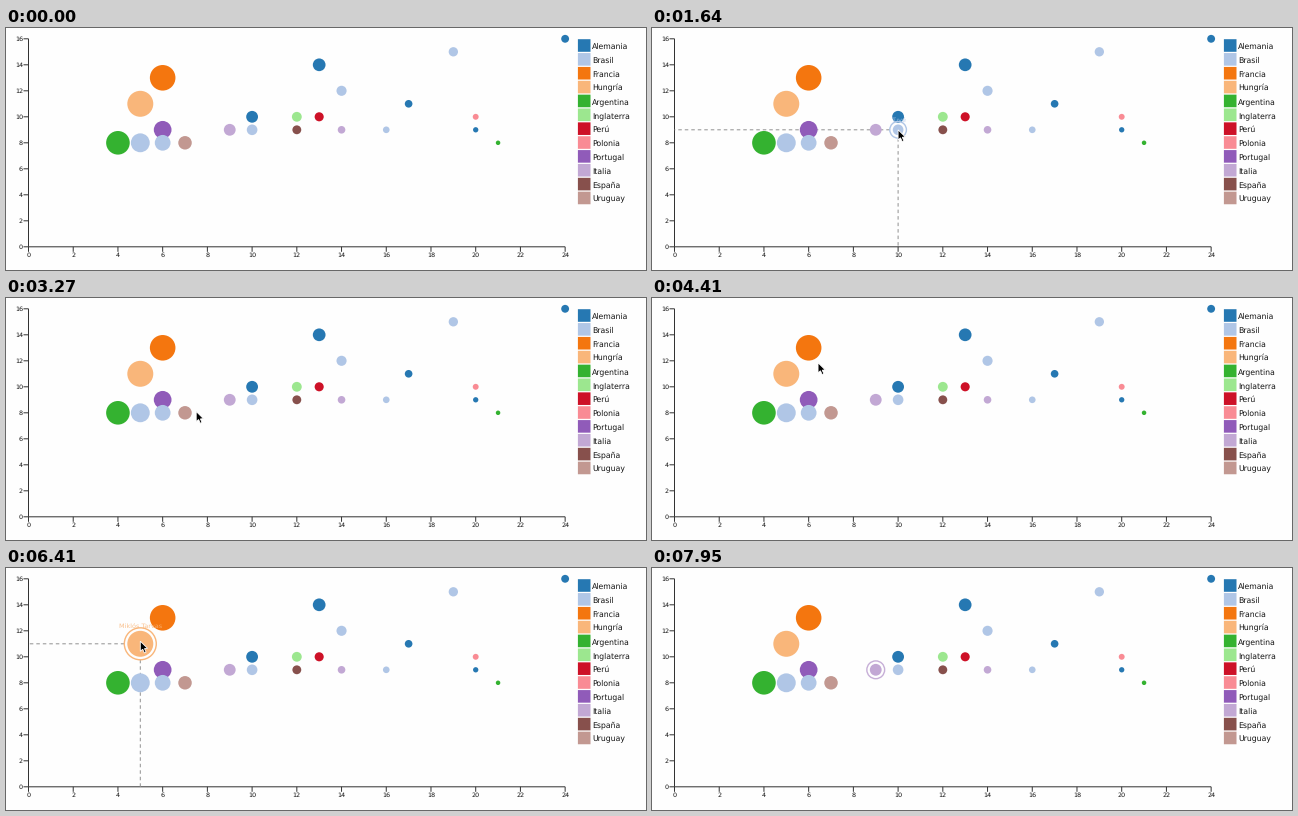
Animation of 640 by 242 pixels, one loop 8 s. Source, as a matplotlib script:

```python
import matplotlib.pyplot as plt
from math import hypot
from matplotlib.animation import FuncAnimation
from matplotlib.patches import Circle, Polygon, Rectangle

W, H, DPI = 640, 242, 100
STEP, FRAMES = 40, 200
PX = 72 / DPI  # points per pixel
X0, Y0 = 22.5, 218.8
GAP = 3  # between a dot and its ring

# country: colour, player, (matches, goals) pairs
TEAMS = {
    "Alemania": ("#2678b2", "Jens Hallbruck",
                 [(24, 16), (13, 14), (17, 11), (10, 10), (20, 9)]),
    "Brasil": ("#b0c6e6", "Tuvé",
               [(19, 15), (14, 12), (10, 9), (16, 9), (5, 8), (6, 8)]),
    "Francia": ("#f4760f", "Luc Bremontel", [(6, 13)]),
    "Hungría": ("#f9b67a", "Miklós Tarvas", [(5, 11)]),
    "Argentina": ("#34b230", "Nico Baldarre", [(4, 8), (21, 8)]),
    "Inglaterra": ("#9ce78f", "Neil Harwick", [(12, 10)]),
    "Perú": ("#cd1127", "Tito Quirama", [(13, 10)]),
    "Polonia": ("#f98b94", "Jan Wolbicki", [(20, 10)]),
    "Portugal": ("#905bb9", "Rui Valdeira", [(6, 9)]),
    "Italia": ("#c2a8d4", "Dario Velucci", [(9, 9), (14, 9)]),
    "España": ("#87504c", "Iker Zaldoa", [(12, 9)]),
    "Uruguay": ("#c29891", "Aníbal Torrano", [(7, 8)]),
}

# cursor rests: from ms, to ms, matches, goals
STOPS = [
    (160, 160, 13.8, 5.3), (640, 2050, 10, 9), (2650, 2750, 7, 8),
    (3000, 3270, 7.5, 8.1), (3700, 3900, 6.1, 13), (4150, 4410, 6.42, 11.85),
    (4700, 4900, 6, 13), (5600, 5640, 5.38, 11.78), (5900, 6550, 5, 11.2),
    (6950, 7330, 7, -2.2), (7600, 7840, 9, 9), (7920, 7920, 9.4, -2.5),
]

ARROW = [(0, 0), (0, 10.2), (2.4, 8), (4.1, 11.8), (5.8, 11),
         (4.2, 7.4), (7.3, 7.2)]

plt.rcParams["font.family"] = "DejaVu Sans"
plt.rcParams["text.hinting"] = "none"

fig = plt.figure(figsize=(W / DPI, H / DPI), dpi=DPI, facecolor="#fefefe")
ax = fig.add_axes([0, 0, 1, 1])
ax.set_xlim(0, W)
ax.set_ylim(H, 0)
ax.axis("off")


def sx(v):
    return X0 + 22.36 * v


def sy(v):
    return Y0 - 13 * v


def line(x0, y0, x1, y1, **kw):
    style = dict(color="#333333", lw=PX, solid_capstyle="butt", snap=False)
    return ax.plot([x0, x1], [y0, y1], **{**style, **kw})[0]


def text(x, y, s, size, ha="center", **kw):
    style = dict(color="#111111", va="baseline", ha=ha)
    return ax.text(x, y, s, fontsize=size * PX, **{**style, **kw})


def draw_axes():
    line(X0, Y0, sx(24), Y0)
    line(X0, sy(16), X0, Y0)
    for v in range(0, 25, 2):
        line(sx(v), Y0, sx(v), Y0 + 5)
        text(sx(v), 229, str(v), 6.4)
    for v in range(0, 17, 2):
        line(X0 - 5, sy(v), X0, sy(v))
        text(17, sy(v) + 2.3, str(v), 6.4, ha="right")


def draw_legend():
    for i, (name, (color, *_)) in enumerate(TEAMS.items()):
        y = 11.2 + 13.86 * i
        ax.add_patch(Rectangle((571.9, y), 12.6, 12.6, fc=color, lw=0,
                               snap=False))
        text(586, y + 9.6, name, 7.8, ha="left")


class Dot:
    """A bubble sized by goals per match, with its hover ring."""

    def __init__(self, color, player, matches, goals):
        self.color, self.player = color, player
        self.x, self.y = sx(matches), sy(goals)
        self.r = 5.9 * goals / matches
        ax.add_patch(Circle((self.x, self.y), self.r, fc=color, lw=0,
                            zorder=3))
        self.ring = ax.add_patch(Circle((self.x, self.y), self.r + GAP,
                                        fill=False, ec=color, lw=1.4 * PX,
                                        zorder=4))
        self.levels = self.ring_levels()

    def holds(self, pos):
        return bool(pos) and hypot(pos[0] - self.x, pos[1] - self.y) < self.r

    def ring_levels(self):
        """Ring strength per frame: quick rise, slower fade."""
        level, out = 0, []
        for pos in cursor_path:
            level += 0.5 if self.holds(pos) else -0.14
            level = min(1, max(0, level))
            out.append(level)
        return out


def cursor_at(t):
    for (_, leave, m0, g0), (arrive, end, m1, g1) in zip(STOPS, STOPS[1:]):
        if leave <= t <= end:
            u = min(1, (t - leave) / (arrive - leave))
            u = u * u * (3 - 2 * u)
            return sx(m0 + (m1 - m0) * u), sy(g0 + (g1 - g0) * u)
    return None


cursor_path = [cursor_at(i * STEP) for i in range(FRAMES)]

draw_axes()
draw_legend()
entries = [(color, player, m, g)
           for color, player, pairs in TEAMS.values() for m, g in pairs]
dots = [Dot(*e) for e in sorted(entries, key=lambda e: -e[3])]

guide = dict(color="#929292", dashes=(3.5, 3), zorder=2)
h_guide = line(0, 0, 0, 0, **guide)
v_guide = line(0, 0, 0, 0, **guide)
label = text(0, 0, "", 6.5, alpha=0.85, zorder=5)
cursor = ax.add_patch(Polygon(ARROW, closed=True, fc="black", ec="white",
                              lw=0.8 * PX, zorder=6))


def show_guides(dot):
    for a in (h_guide, v_guide, label):
        a.set_visible(dot is not None)
    if dot:
        edge = dot.r + GAP
        h_guide.set_data([dot.x - edge, X0], [dot.y, dot.y])
        v_guide.set_data([dot.x, dot.x], [dot.y + edge, Y0])
        label.set_text(dot.player)
        label.set_color(dot.color)
        label.set_position((dot.x, dot.y - dot.r - GAP))


def update(i):
    pos = cursor_path[i]
    for d in dots:
        d.ring.set_alpha(1 - (1 - d.levels[i]) ** 2)
    show_guides(next((d for d in dots if d.holds(pos)), None))
    cursor.set_visible(pos is not None)
    if pos:
        cursor.set_xy([(pos[0] + dx, pos[1] + dy) for dx, dy in ARROW])
    return []


anim = FuncAnimation(fig, update, frames=FRAMES, interval=STEP,
                     init_func=lambda: update(0), repeat=True,
                     repeat_delay=0, blit=False)
plt.show()
```
